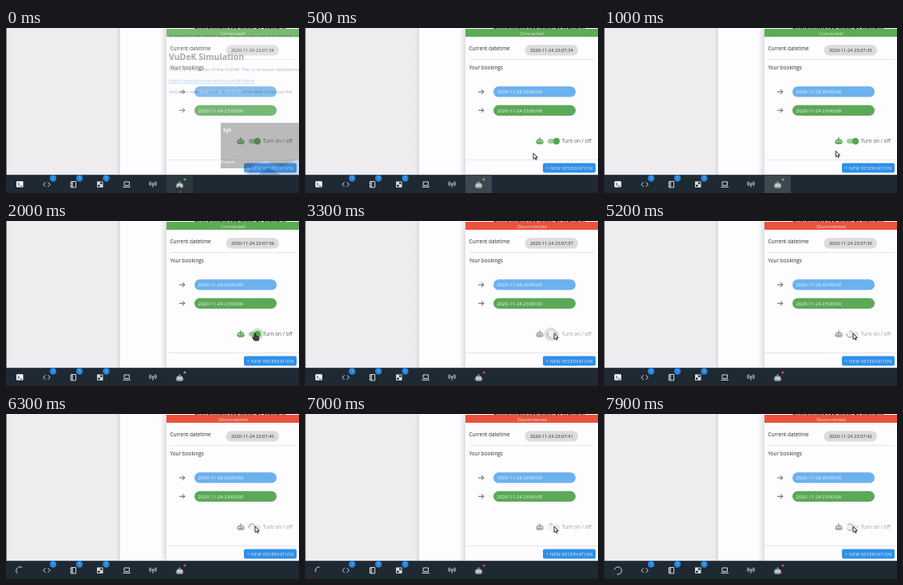
An HTML page that plays this animation: 367x207 px, repeating every 8 s.

```html
<!DOCTYPE html>
<html lang="en">
<head>
<meta charset="utf-8">
<style>
html, body { margin: 0; width: 100%; height: 100%; overflow: hidden; }
svg { display: block; width: 367px; height: 207px; font: 500 6.4px "Open Sans", sans-serif; }
.mid { text-anchor: middle; }
.line { fill: none; stroke: currentColor; stroke-width: 1; }
#under { mix-blend-mode: multiply; }
</style>
</head>
<body>
<svg viewBox="0 0 367 207">
  <defs>
    <linearGradient id="shade">
      <stop offset="0" stop-color="#000" stop-opacity="0"/>
      <stop offset="1" stop-color="#000" stop-opacity=".16"/>
    </linearGradient>
    <g id="bot" fill="currentColor">
      <path d="M-.5-4h1v1.500h1.800a1.500 1.500 0 0 1 1.500 1.500V2.500a1.300 1.300 0 0 1-1.300 1.300h-5a1.300 1.300 0 0 1-1.300-1.300V-1a1.500 1.500 0 0 1 1.500-1.500h1.800z"/>
      <path d="M-4.700-.3h.9v2.800h-.9zM3.800-.3h.9v2.800h-.9z"/>
      <circle cy="-3.900" r=".9"/>
      <path d="M-2.300-.6h1.500v1.500h-1.500zM.8-.6h1.500v1.500H.8z" fill="#fff"/>
    </g>
    <g id="badge">
      <circle r="4.200" fill="#2486e0"/>
      <text class="mid" y="1.700" font-size="4.600" fill="#b9dcfa">1</text>
    </g>
    <path id="arrow" class="line" d="M-3.300 0h6.600M.5-2.900l2.900 2.900-2.900 2.900"/>
    <g id="antenna" class="line" stroke-width=".9">
      <path d="M0 0v4.500M-1.700-1.700a2.400 2.400 0 0 0 0 3.400M1.700-1.700a2.400 2.400 0 0 1 0 3.400M-3.100-2.900a4.200 4.200 0 0 0 0 5.800M3.100-2.900a4.200 4.200 0 0 1 0 5.800"/>
      <circle r=".5" fill="currentColor"/>
    </g>
  </defs>

  <rect width="367" height="207" fill="#fdfcfe"/>
  <rect width="143" height="185" fill="#eeecef"/>
  <rect x="138" width="5" height="185" fill="url(#shade)" opacity=".5"/>
  <rect width="1" height="185" fill="#777"/>
  <text x="236" y="1" font-weight="bold" fill="#111">environment you know, by typing in</text>

  <rect x="193" y="1" width="8" height="184" fill="url(#shade)" opacity=".75"/>
  <rect x="201" y="1" width="166" height="184" fill="#fdfcfe"/>
  <g id="panel" fill="#2c2c2c">
    <rect id="head" x="201" y="1" width="166" height="10"/>
    <text id="status" class="mid" x="284.500" y="8.500" font-size="5.800" fill="#e8e3d6"></text>
    <text x="205.500" y="28">Current datetime</text>
    <rect x="275.500" y="21.300" width="66.500" height="13.300" rx="6.650" fill="#dcdbdd"/>
    <text id="clock" class="mid" x="308.800" y="30.100" font-size="5.700"></text>
    <path d="M206 39.500h157M201 165.500h166" stroke="#e8e6e9"/>
    <text x="205.500" y="51.700">Your bookings</text>
    <g color="#555"><use href="#arrow" x="220.500" y="80"/><use href="#arrow" x="220.500" y="103.300"/></g>
    <rect x="236" y="73.300" width="103" height="13.300" rx="6.650" fill="#6bb1ee"/>
    <rect x="236" y="96.700" width="103" height="13.300" rx="6.650" fill="#5ca957"/>
    <g font-size="6" fill="#f2f8fa">
      <text x="240.500" y="82.100">2020-11-28 20:00:00</text>
      <text x="240.500" y="105.500">2020-11-24 23:00:00</text>
    </g>
    <use id="robot" href="#bot" x="294" y="142"/>
    <rect id="track" x="304" y="139" width="15" height="6" rx="3"/>
    <g id="knob">
      <circle id="halo"/>
      <circle id="ball" r="4.200"/>
      <path id="wait" fill="none" stroke="#6fb56a" stroke-width="1"/>
    </g>
    <text id="label" x="321.800" y="144.100">Turn on / off</text>
    <rect x="298" y="169.600" width="66" height="12" rx="2" fill="#2f8fe8"/>
    <text class="mid" x="331.200" y="177.500" font-size="5.200" letter-spacing=".5" fill="#e6f2fd">+ NEW RESERVATION</text>
  </g>

  <g id="under" fill="#666">
    <text x="204" y="12" font-size="5.500">provided by the robot's owner. You can also use it to develop your</text>
    <text x="204" y="40" font-size="10.500" font-weight="bold" fill="#555">VuDeK Simulation</text>
    <text x="204" y="54" font-size="5.800">This is a simulation of the VuDeK. This is an exact representation</text>
    <text x="204" y="68" font-size="5.500" fill="#4a9be0" text-decoration="underline">https://app.theconstructsim.com/#/Home</text>
    <text x="204" y="82" font-size="5.800">Also, you need to know that you will be able to access the</text>
    <path d="M269 119h98v57h-98z" fill="#777"/>
    <path d="M301 184l10-13 14-4 20 7 22-10v20z" fill="#8fb4dc"/>
    <path d="M316 184l12-9 16 9z" fill="#2c62a8"/>
    <use href="#antenna" x="277" y="128" color="#fff"/>
    <text x="269" y="170" font-size="5.500" fill="#fff">Robots</text>
  </g>

  <rect y="184.200" width="367" height="23" fill="#1e2933"/>
  <rect id="active" x="201" y="184.200" width="33" height="23" fill="#3c474f"/>
  <g color="#d5dade">
    <g id="terminal">
      <rect x="13" y="192.300" width="8.500" height="7.500" rx=".8" fill="#fff"/>
      <path d="M14.700 194l2 2-2 2M17.500 198.200h2.600" fill="none" stroke="#1e2933"/>
    </g>
    <path id="load" class="line"/>
    <path class="line" d="M49.500 193.300l-2.700 2.900 2.700 2.900M52.500 193.300l2.700 2.900-2.700 2.900"/>
    <path class="line" d="M81.500 192.500h6v7.500h-6zM83.300 192.500v7.500M80.500 194.500h2M80.500 198h2"/>
    <path d="M114 192.500h7.500v7.500h-7.500z" fill="currentColor"/>
    <path d="M118 193.500h2.600v2.300h-2.600zM115 196.700h2.600v2.300h-2.600z" fill="#1e2933"/>
    <path class="line" d="M148 193h6.500v4.500h-6.500zM146.500 199.500h9.500"/>
    <use href="#antenna" x="184" y="195.300"/>
    <use href="#bot" x="217.500" y="197" color="#a9b1b7"/>
    <use href="#badge" x="59" y="188.500"/>
    <use href="#badge" x="92" y="188.500"/>
    <use href="#badge" x="125.500" y="188.500"/>
    <circle id="dot" cx="224" cy="190" r="1.600"/>
  </g>

  <g id="cursor" fill="#eee" stroke="#222" stroke-width=".9">
    <path id="tip" d="M0 0v7.500l1.800-1.600 1.200 2.500 1.200-.6-1.200-2.400h2.300z"/>
    <path id="hand" fill="#444" d="M-.9.500Q0-.7.900.5V3.300L3.800 4q1.100.3 1 1.500L4.200 9h-5L-3.300 5.500q-.2-1.200 1-1.100L-.9 5.500z"/>
  </g>
</svg>
<script>
const $ = id => document.getElementById(id);
const set = (id, attrs) => { for (const k in attrs) $(id).setAttribute(k, attrs[k]); };
const ramp = (t, from, to) => Math.min(1, Math.max(0, (t - from) / (to - from)));
const ease = x => x * x * (3 - 2 * x);
const mix = (a, b, k) => a + (b - a) * k;

const LOOP = 8000, CLICK = 2800, OFFLINE = 3000, LOADING = 5900;
const PATH = [[0, 217, 199], [100, 219, 197], [500, 286, 157], [900, 289, 155], [1600, 312, 141], [LOOP, 312, 141]];

function pointer(t) {
  const i = PATH.findIndex(p => p[0] > t);
  const [a, b] = [PATH[i - 1], PATH[i]];
  const k = ease(ramp(t, a[0], b[0]));
  return [mix(a[1], b[1], k), mix(a[2], b[2], k)];
}

// Indeterminate spinner: the arc grows, then its tail catches up while it all turns.
function spinner(t, cx, cy, r) {
  const p = (t / 1400) % 1;
  const grow = ease(ramp(p, 0, .5)), chase = ease(ramp(p, .5, 1));
  const tail = 15 * grow + 110 * chase;
  const tip = Math.min(125, tail + 1 + 99 * grow);
  const point = u => {
    const a = 2 * Math.PI * (u / 126 + p);
    return `${cx + r * Math.cos(a)} ${cy + r * Math.sin(a)}`;
  };
  return `M${point(tail)}A${r} ${r} 0 ${tip - tail > 63 ? 1 : 0} 1 ${point(tip)}`;
}

function draw(t) {
  const shown = ramp(t, 0, 250), online = t < OFFLINE, on = t < CLICK;
  set('panel', { opacity: mix(.82, 1, shown) });
  set('under', { opacity: .5 * (1 - shown) });

  set('head', { fill: online ? '#5cab55' : '#ea523c' });
  set('dot', { fill: online ? '#5cb852' : '#e2473a' });
  $('status').textContent = online ? 'Connected!' : 'Disconnected';
  $('clock').textContent = '2020-11-24 23:07:' + (34 + Math.floor((t + 200) / 1000));

  const slide = ease(ramp(t, CLICK, CLICK + 150));
  const hover = ramp(t, 1450, 1600) * (1 - ramp(t, 3350, 3700));
  const press = ramp(t, 2450, 2600);
  set('knob', { transform: `translate(${mix(315, 308, slide)} 142)` });
  set('halo', { r: on ? 7.5 : 8.5, fill: on ? '#5ca957' : '#74806f', opacity: hover * (on ? mix(.3, .36, press) : .22) });
  set('ball', { fill: on ? '#55a650' : '#f0f2f0' });
  set('track', { fill: on ? '#a5c8a2' : '#e6e6e6' });
  set('robot', { color: on ? '#5ca957' : '#a6a6a6' });
  set('label', { fill: on ? '#5c5c5c' : '#9c9c9c' });
  set('wait', { d: online ? '' : spinner(t - OFFLINE, 0, 0, 4) });

  set('active', { opacity: mix(.45, 1, shown) * (1 - ramp(t, 1100, 1300)) });
  set('terminal', { opacity: t < LOADING ? 1 : 0 });
  set('load', { d: t < LOADING ? '' : spinner(t - LOADING, 17.5, 196.500, 4.6) });

  const [x, y] = pointer(t);
  const hand = y > 184 || (x > 304 && on);
  set('cursor', { transform: `translate(${x} ${y})` });
  set('hand', { opacity: hand ? 1 : 0 });
  set('tip', { opacity: hand ? 0 : 1 });
}

function tick() {
  draw(performance.now() % LOOP);
  requestAnimationFrame(tick);
}
tick();
</script>
</body>
</html>
```
